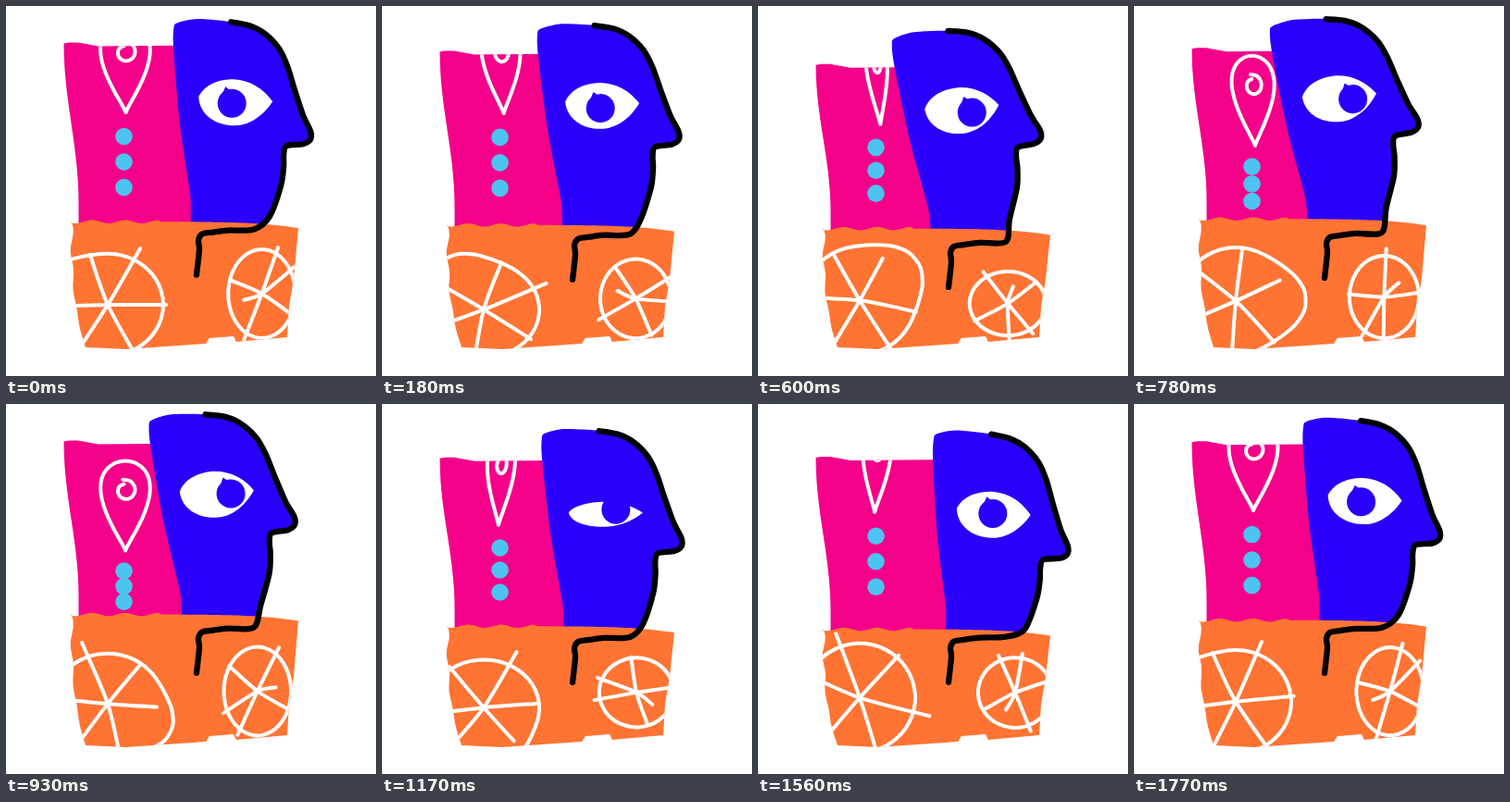
An HTML page with a canvas that plays this animation: 400x400 px, repeating every 1.8 s.

```html
<!DOCTYPE html>
<html lang="en">
<head>
<meta charset="utf-8">
<title>Bobbing head</title>
<style>
html, body { margin: 0; width: 100%; height: 100%; overflow: hidden; background: #fff; }
canvas { display: block; width: 400px; height: 400px; }
</style>
</head>
<body>
<canvas id="stage" width="400" height="400"></canvas>
<script>
const ctx = document.getElementById('stage').getContext('2d');
const LOOP = 1800, STEP = 30, TAU = Math.PI * 2;
const PINK = '#f4008a', BLUE = '#2b00fa', ORANGE = '#ff7433', CYAN = '#4dc3f0';
const { sin, cos, max, min, abs, exp } = Math;
const rad = deg => deg * Math.PI / 180;
const steps = (n, f) => Array.from({ length: n + 1 }, (_, i) => f(i / n, i));

// Each spoke: angle and length of one arm, then of the other.
const BIG_SPOKES = [[28, 75, 211, 57], [90, 63, 268, 53], [342, 62, 153, 78]];
const SMALL_SPOKES = [[25, 46, 207, 47], [118, 41, 288, 38], [58, 45, 255, 22]];

// Head outline in its upright pose, with the nose tip as pivot.
const NOSE = [331, 143], EYE = [207, 100];
const FACE = [[242, 18], [262, 22], [279, 31], [294, 47], [303, 66], [311, 92], [320, 119],
  [328, 136], [328, 145], [320, 150], [302, 152], [299, 162], [299, 174], [296, 195], [284, 228]];
const BACK = [[202, 250], [198, 205], [187, 130], [180, 50], [180, 25], [184, 19], [203, 15], [225, 16]];

const DROP = steps(24, u => {
  const a = u * TAU;
  return [1 - 37 * sin(a) * sin(a / 2) ** 1.3, -48.5 * (1 - cos(a))];
});
const CORE = steps(9, (u, i) => {
  const a = -0.2 - i * 0.7, r = 7 + 5 * u;
  return [1 + r * sin(a), -65 - r * cos(a)];
});

function curve(pts, closed) {
  const n = pts.length;
  const at = i => closed ? pts[(i + n) % n] : pts[max(0, min(n - 1, i))];
  ctx.beginPath();
  ctx.moveTo(...pts[0]);
  for (let i = 0; i < (closed ? n : n - 1); i++) {
    const [a, b, c, d] = [at(i - 1), at(i), at(i + 1), at(i + 2)];
    ctx.bezierCurveTo(b[0] + (c[0] - a[0]) / 7, b[1] + (c[1] - a[1]) / 7,
      c[0] - (d[0] - b[0]) / 7, c[1] - (d[1] - b[1]) / 7, c[0], c[1]);
  }
  if (closed) ctx.closePath();
}

function poly(pts) {
  ctx.beginPath();
  pts.forEach(p => ctx.lineTo(...p));
  ctx.closePath();
}

function fill(color) {
  ctx.fillStyle = color;
  ctx.fill();
}

function stroke(color, width) {
  ctx.strokeStyle = color;
  ctx.lineWidth = width;
  ctx.stroke();
}

function disc(x, y, r, color) {
  ctx.beginPath();
  ctx.arc(x, y, r, 0, TAU);
  fill(color);
}

function wheel(x, y, sx, sy, turn, radius, spokes) {
  const at = (deg, r) => {
    const a = rad(deg) + turn;
    return [x + sin(a) * r * sx, y - cos(a) * r * sy];
  };
  curve(steps(23, (_, i) => at(i * 15, radius(i * 15))), true);
  stroke('#fff', 4);
  for (const [a, r, b, q] of spokes) {
    curve([at(a, r), [x, y], at(b, q)]);
    stroke('#fff', 4);
  }
}

function drawBody(m) {
  const top = 54.3 + 14.8 * m.bob, h = m.seat - top;
  const hop = 1.5 * (m.bob + 1);
  const width = 0.64 - 0.36 * m.bob;
  const lean = 0.5 + 4 * sin(m.angle);
  const tipY = 115 + hop + 44 * m.drop;

  ctx.save();
  poly([
    [212, top + h + 10], [212, top + 3], [100, top + 4], [78, top], [68, top],
    ...steps(16, u => [70.5 - 8 * cos(Math.PI * min(1, u * 1.15)), top + 1 + u * (h + 5)])
  ]);
  fill(PINK);
  ctx.clip();
  for (const shape of [DROP, CORE]) {
    curve(shape.map(([x, y]) => [128 + x * width + lean * (1 + y / 60), tipY + y]));
    stroke('#fff', 4);
  }
  ctx.restore();

  for (let i = 0; i < 3; i++) {
    disc(127.5, 141 + 27.5 * i + hop + m.drop * (40 - 11 * i), 9.3, CYAN);
  }
}

function drawEye(m, place) {
  const off = min(1, abs(m.t - 1230) / 120);
  const open = 1 - 0.46 * (1 + cos(Math.PI * off));
  ctx.save();
  ctx.translate(...place(EYE));
  ctx.rotate(m.tilt);
  ctx.save();
  ctx.translate(0, 12);
  ctx.scale(1, open);
  ctx.translate(0, -12);
  ctx.beginPath();
  ctx.moveTo(0, -1);
  ctx.bezierCurveTo(7, -15, 22, -20, 38, -20);
  ctx.bezierCurveTo(56, -19, 70, -10, 80, 4);
  ctx.bezierCurveTo(71, 18, 56, 30, 39, 30);
  ctx.bezierCurveTo(18, 30, 1, 18, 0, -1);
  fill('#fff');
  ctx.restore();

  // The pupil circles once per loop.
  ctx.translate(45.5 - 9.5 * cos(m.angle), 6 + 3 * sin(m.angle));
  disc(0, 0, 15.5, BLUE);
  poly([[-7, -18], [1, -12], [-11, -9]]);
  fill(BLUE);
  ctx.restore();
}

function drawCart(m) {
  const s = m.seat, wave = sin(2 * m.angle);
  ctx.save();
  poly([
    ...steps(60, u => {
      const x = 70 + 246 * u;
      return [x, s + 7 * u ** 6 + (x < 165 ? 1.8 * cos((x - 75) / 5.7) : 0)];
    }),
    [311, 295], [306, 325], [304, 358], [249, 363], [246, 357], [220, 359], [216, 365], [130, 371],
    ...steps(20, v => {
      const u = 1 - v;
      return [71 + 15 * u ** 3 + 2 * sin(u * 20) * (1 - u), s + u * (369 - s)];
    })
  ]);
  fill(ORANGE);
  ctx.clip();
  wheel(110, 323 + 5.5 * wave, 1, 0.92 - 0.06 * wave, m.angle,
    deg => 60 + 16 * max(0, cos(rad(deg - 293))) ** 6, BIG_SPOKES);
  wheel(274 + 4 * m.sway, 315 + 4 * m.bob + 5 * sin(m.angle),
    (39.5 + 3.2 * m.bob) / 40, (39.5 - 8.5 * m.bob) / 40, m.angle, () => 40, SMALL_SPOKES);
  ctx.restore();
}

function draw(t) {
  const angle = t / LOOP * TAU;
  const bob = -cos(2 * TAU * (t - 12) / LOOP);
  const sway = cos(TAU * (t - 1545) / LOOP);
  const m = {
    t, angle, bob, sway,
    tilt: rad(-2.6 + 4.2 * sway),
    seat: 238.7 + 8.5 * bob + 3.4 * cos(TAU * (t - 1650) / LOOP),
    drop: ((1 - cos(angle)) / 2) ** 5
  };
  const nose = [323 + 14.6 * sway, 146 + 11.3 * bob + 12 * sway];
  const c = cos(m.tilt), s = sin(m.tilt);
  const place = ([x, y]) => {
    const dx = x - NOSE[0], dy = y - NOSE[1];
    return [nose[0] + dx * c - dy * s, nose[1] + dx * s + dy * c];
  };
  const neck = 254 + 8.5 * bob;
  const front = [...FACE.map(place), [268, neck - 4], [240, neck - 3]];

  ctx.fillStyle = '#fff';
  ctx.fillRect(0, 0, 400, 400);
  ctx.lineJoin = ctx.lineCap = 'round';

  drawBody(m);
  curve([...front, ...BACK.map(place)], true);
  fill(BLUE);
  drawEye(m, place);
  drawCart(m);

  curve([...front, [224, neck - 1], [212, neck + 1], [208, neck + 8], [209, neck + 18], [206, neck + 45]]);
  stroke('#000', 6.3);
}

const start = performance.now();
function tick(now) {
  const t = max(0, now - start) % LOOP;
  draw(Math.floor(t / STEP) * STEP);
  requestAnimationFrame(tick);
}
draw(0);
requestAnimationFrame(tick);
</script>
</body>
</html>
```
